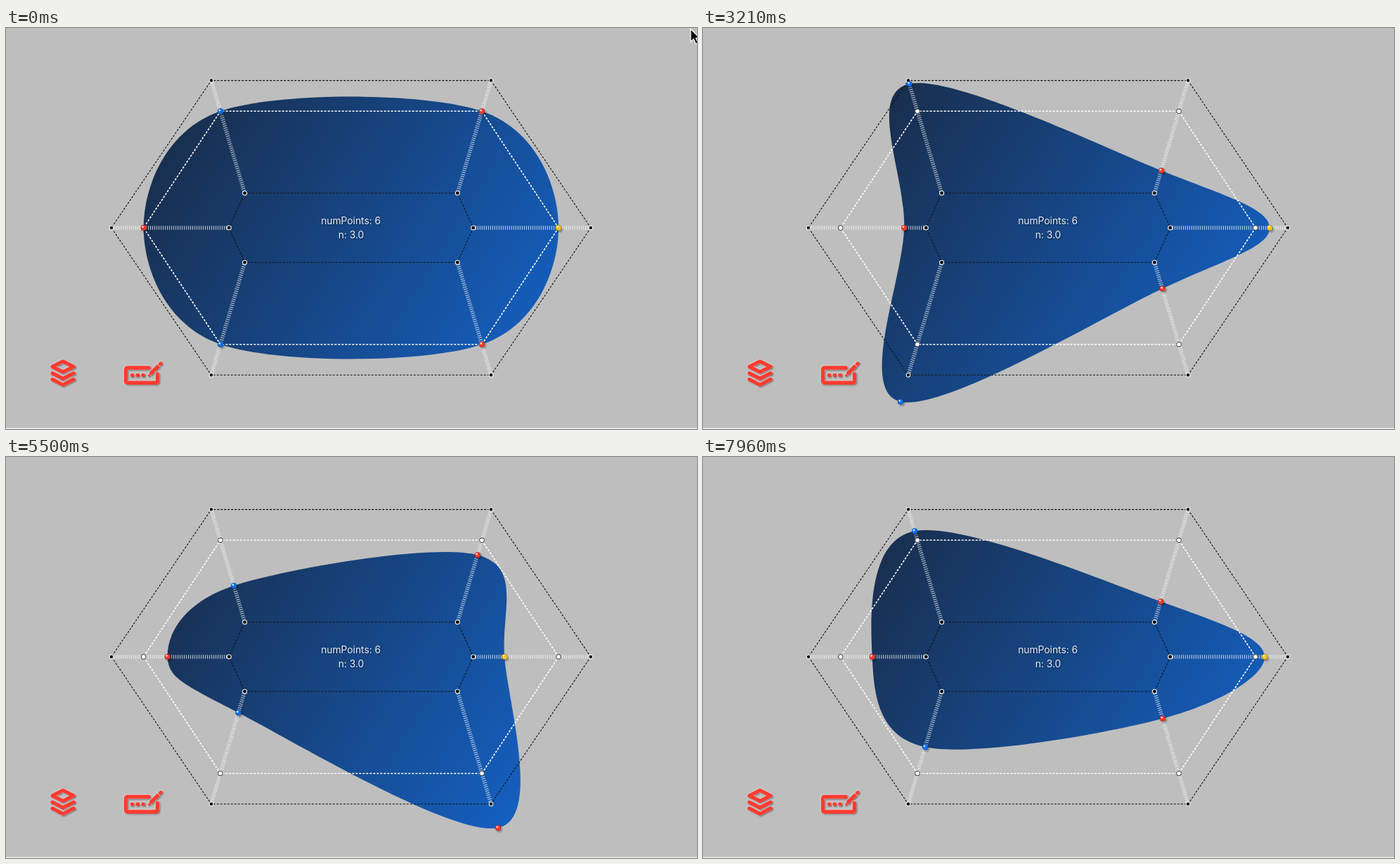
Animation, 983 px wide and 570 px high, one loop 8 s. Source, as an HTML page:

```html
<!DOCTYPE html>
<html lang="en">
<head>
<meta charset="utf-8">
<title>Blob points</title>
<style>
  html, body { margin: 0; width: 100%; height: 100%; overflow: hidden; background: #bebebe; }
  svg { display: block; width: 100%; height: 100%; }
  text { font: 400 13.8px Inter, "Open Sans", sans-serif; fill: #e9ebef; text-anchor: middle; }
  .icon { fill: none; stroke: #ff3b30; stroke-linejoin: round; stroke-linecap: round;
    filter: drop-shadow(0 0 .8px #fff) drop-shadow(1.2px 1.2px .6px rgba(0,0,0,.5)); }
  .ring { fill: none; stroke: #111; stroke-width: 1.1; stroke-dasharray: 3 2; }
  .mid { stroke: #fff; stroke-width: 1.6; }
  .spoke { stroke: #fff; stroke-opacity: .6; stroke-width: 5.5; stroke-dasharray: 1.3 1.7; }
  .dot { fill: #050505; stroke: #f4f4f4; stroke-width: 1.1; }
  .hollow { fill: #fff; stroke: #333; stroke-width: 1; }
  #stack { animation: press 8s linear infinite; }
  @keyframes press {
    0%, .49% { opacity: 1 }
    .5%, 2% { opacity: .5 }
    5.2%, 100% { opacity: 1 }
  }
</style>
</head>
<body>
<svg viewBox="0 0 983 570" preserveAspectRatio="none">
  <defs>
    <linearGradient id="fill" gradientUnits="userSpaceOnUse" x1="208" y1="98" x2="802" y2="470">
      <stop offset="0" stop-color="#192a44"/>
      <stop offset="1" stop-color="#1463c8"/>
    </linearGradient>
  </defs>
  <rect width="983" height="570" fill="#bebebe"/>
  <rect y="568.6" width="983" height="1.4" fill="#f3f3f3"/>
  <path id="blob" fill="url(#fill)"/>
  <g id="guides"></g>
  <g style="filter:drop-shadow(1px 1px .8px rgba(0,0,0,.45))">
    <text x="490.7" y="279">numPoints: 6</text>
    <text x="491" y="299.3">n: 3.0</text>
  </g>
  <g id="balls"></g>
  <g id="stack">
    <g class="icon" stroke-width="5.2">
      <path d="M81 473.8L96 481.4L81 489L66 481.4Z"/>
      <path d="M65.8 490.6L81 498.4L96.2 490.6M65.8 499.4L81 507.2L96.2 499.4"/>
    </g>
  </g>
  <g class="icon" stroke-width="5.4">
    <path d="M203 483H173.5Q170.5 483 170.5 486V501.2Q170.5 504.2 173.5 504.2H212.5Q215.5 504.2 215.5 501.2V492"/>
    <path d="M179.5 493.5h.1M187.2 493.5h.1M195 493.5h.1" stroke-width="5.6"/>
    <path d="M205.5 491.5L217.2 480" stroke-width="5.4" stroke-linecap="butt"/>
    <path d="M219.2 477.8L220.2 476.8" stroke-width="4.8"/>
    <path d="M203.3 494L206 491.3" stroke-width="2.8"/>
  </g>
  <path id="cursor" d="M974 1.5V19.5L978.2 15.6L981.2 22.5L984.4 21.1L981.4 14.4H987Z"
    fill="#000" stroke="#fff" stroke-width="1.2"/>
</svg>
<script>
const LOOP = 8000, START = 785, STEP = 2225;
const BLUE = '#0b73f0', RED = '#f8372b', YELLOW = '#fcc21c';

// One spoke per point, clockwise from the right; offsets are the outward
// travel along the spoke at each key pose.
const spokes = [
  { mid: [786, 284], out: [831.8, 284], inn: [664.7, 284], dir: [1, 0], color: YELLOW,
    offsets: [0, 42, -108.5, 57.5, -72] },
  { mid: [677, 449.7], out: [690, 493.3], inn: [642.3, 333.2], dir: [.2955, 1], color: RED,
    offsets: [0, -114, 124.5, -122.5, 7] },
  { mid: [305, 449.7], out: [292, 493.3], inn: [339.6, 333.2], dir: [-.2955, 1], color: BLUE,
    offsets: [0, 113.5, -106.5, 0, -109] },
  { mid: [195.7, 284], out: [150, 284], inn: [317.3, 284], dir: [-1, 0], color: RED,
    offsets: [0, -102.5, -20, -94, 48.5] },
  { mid: [305, 118.3], out: [292, 74.6], inn: [339.6, 234.8], dir: [-.2955, -1], color: BLUE,
    offsets: [0, 62.3, -98.7, 80.5, -116] },
  { mid: [677, 118.3], out: [690, 74.6], inn: [642.3, 234.8], dir: [.2955, -1], color: RED,
    offsets: [0, -99.5, 4, -127, -11] }
];

const byId = id => document.getElementById(id);
function add(parent, tag, attrs) {
  const node = document.createElementNS('http://www.w3.org/2000/svg', tag);
  for (const name in attrs) node.setAttribute(name, attrs[name]);
  return parent.appendChild(node);
}

const guides = byId('guides'), blob = byId('blob'), cursor = byId('cursor');
for (const { inn, out } of spokes)
  add(guides, 'path', { class: 'spoke', d: `M${inn}L${out}` });
for (const [key, cls] of [['out', 'ring'], ['mid', 'ring mid'], ['inn', 'ring']])
  add(guides, 'polygon', { class: cls, points: spokes.map(s => s[key]).join(' ') });
for (const s of spokes)
  for (const [key, cls, r] of [['out', 'dot', 2.8], ['mid', 'hollow', 3.4], ['inn', 'dot', 3]])
    add(guides, 'circle', { class: cls, cx: s[key][0], cy: s[key][1], r });

const balls = spokes.map(({ color }) => {
  const ball = add(byId('balls'), 'g', {});
  add(ball, 'circle', { cx: 2, cy: 2.2, r: 4.2, fill: '#000', opacity: .3, style: 'filter:blur(1.2px)' });
  add(ball, 'circle', { r: 4, fill: color, stroke: '#000', 'stroke-opacity': .3, 'stroke-width': .7 });
  add(ball, 'circle', { cx: -1.2, cy: -1.3, r: 1.4, fill: '#fff', opacity: .8 });
  return ball;
});

// cubic-bezier(0, 0, .58, 1), solved by bisection
function easeOut(x) {
  let low = 0, high = 1;
  for (let i = 0; i < 24; i++) {
    const u = (low + high) / 2;
    if (u * u * (1.74 - .74 * u) < x) low = u; else high = u;
  }
  return low * low * (3 - 2 * low);
}

// Closed Catmull-Rom curve written as cubic Béziers
function smoothPath(points) {
  const n = points.length, at = i => points[(i + n) % n];
  const handle = (i, sign) => at(i).map((v, k) => v + sign * (at(i + 1)[k] - at(i - 1)[k]) / 6);
  return `M${at(0)}` + points.map((_, i) =>
    `C${handle(i, 1)} ${handle(i + 1, -1)} ${at(i + 1)}`).join('') + 'Z';
}

function draw(time) {
  const phase = Math.max(0, time - START) / STEP;
  const pose = Math.floor(phase), mix = easeOut(phase - pose);
  const points = spokes.map(({ mid, dir, offsets }) => {
    const travel = offsets[pose] + (offsets[pose + 1] - offsets[pose]) * mix;
    return mid.map((v, k) => v + dir[k] * travel);
  });
  blob.setAttribute('d', smoothPath(points));
  balls.forEach((ball, i) => ball.setAttribute('transform', `translate(${points[i]})`));
  cursor.setAttribute('visibility', time < 40 ? 'visible' : 'hidden');
}

const origin = performance.now();
function tick() {
  draw((performance.now() - origin) % LOOP);
  requestAnimationFrame(tick);
}
tick();
</script>
</body>
</html>
```
